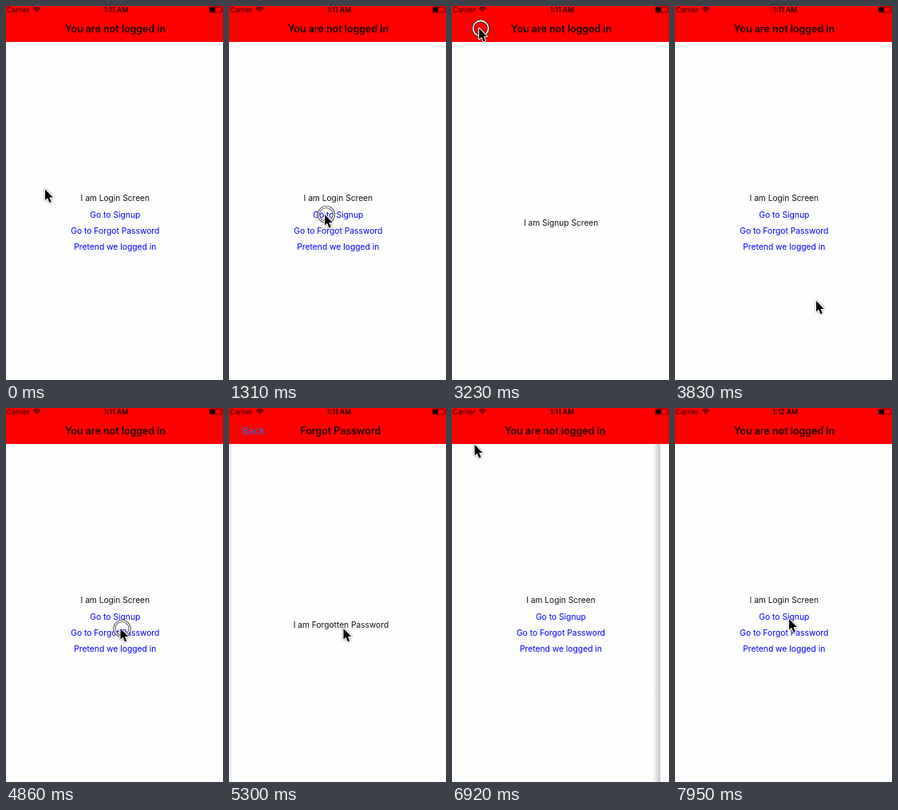
Recreate the animation shown at these times as an HTML page. Size 272 by 468 pixels, loop 8 s.

```html
<!DOCTYPE html>
<html lang="en">
<head>
<meta charset="utf-8">
<title>Login navigation</title>
<style>
  html, body { margin: 0; width: 100%; height: 100%; overflow: hidden; background: #fdfdfd; }
  svg { display: block; width: 100vw; height: 100vh; font-family: Inter, Roboto, sans-serif; }
  text { text-anchor: middle; fill: #111; }
  .body { font-size: 10.2px; }
  .link { font-size: 10.3px; fill: #00f; }
  .title { font-size: 12.44px; font-weight: 600; fill: #1a0000; }
  .status { font-size: 8.7px; fill: #200; }
  .arrow { filter: drop-shadow(0 .8px .8px rgba(0, 0, 0, .5)); }
</style>
</head>
<body>
<svg viewBox="0 0 272 468" xmlns="http://www.w3.org/2000/svg">
  <defs>
    <linearGradient id="fade">
      <stop offset="0" stop-color="#000" stop-opacity="0"/>
      <stop offset=".6" stop-color="#000" stop-opacity=".13"/>
      <stop offset="1" stop-color="#000" stop-opacity=".22"/>
    </linearGradient>
  </defs>

  <rect width="272" height="468" fill="#fdfdfd"/>
  <g id="login">
    <text class="body" x="136.8" y="244.3">I am Login Screen</text>
    <text class="link" x="136.8" y="264.6">Go to Signup</text>
    <text class="link" x="136.8" y="284.8">Go to Forgot Password</text>
    <text class="link" x="136.8" y="305">Pretend we logged in</text>
  </g>

  <g id="card">
    <rect id="shadow" x="-10" y="44" width="10" height="424" fill="url(#fade)"/>
    <rect y="44" width="272" height="424" fill="#fefefe"/>
    <text id="cardText" class="body" x="136.6" y="274.7"></text>
  </g>

  <rect width="272" height="45" fill="#f00"/>
  <text id="loginTitle" class="title" x="137" y="33.2">You are not logged in</text>
  <text id="cardTitle" class="title" x="137" y="33.2"></text>
  <text id="back" x="30.6" y="33.2" font-size="12.33" style="fill:#2a6fe0">Back</text>

  <text class="status" x="15.3" y="8">Carrier</text>
  <g fill="none" stroke="#200" stroke-width="1.3">
    <path d="M34 3.6Q38.5 -.2 43 3.6M35.8 5.3Q38.5 3 41.2 5.3"/>
    <path d="M37.2 6.3L38.5 8L39.8 6.3Q38.5 5.3 37.2 6.3Z" fill="#200" stroke="none"/>
  </g>
  <text id="clock" class="status" x="138" y="8" font-weight="600"></text>
  <rect x="255" y="1.2" width="15.6" height="6.8" rx="1" fill="none" stroke="#400" stroke-width=".8"/>
  <rect x="255.6" y="1.8" width="6.6" height="5.6" fill="#100"/>

  <g id="cursor">
    <g id="ring" fill="none">
      <circle cx="2" cy="0" r="9.6" stroke="#222" stroke-width="3"/>
      <circle cx="2" cy="0" r="9.6" stroke="#fff" stroke-width="1.6"/>
    </g>
    <path class="arrow" d="M0 0V13.6L3.1 10.8L5.5 16.4L7.8 15.4L5.4 10H9.8Z" fill="#000"
      stroke="#fff" stroke-width="2" stroke-linejoin="round" paint-order="stroke"/>
  </g>
</svg>
<script>
const LOOP = 8000;
const el = id => document.getElementById(id);

const bursts = [
  [150, 890, 6], [1310, 2040, 6], [2340, 2940, 5], [3230, 3830, 5],
  [4130, 5160, 8], [5300, 6340, 8], [6480, 7360, 7], [7650, 7950, 3]
];

// Pointer stops: time, x, y
const stops = [
  [40, 49, 229.5], [890, 120, 261], [2220, 120, 261], [2940, 34, 28],
  [3320, 34, 28], [3830, 177, 369], [4040, 177, 369], [4719, 143.5, 276],
  [5360, 143.5, 276], [6340, 33, 28], [6600, 33, 28], [6920, 28.5, 46],
  [7360, 62, 311], [7580, 62, 311], [7950, 143, 264]
];

const presses = [1310, 3230, 4866, 6480];

const signup = { title: "You are not logged in", text: "I am Signup Screen" };
const forgot = { title: "Forgot Password", text: "I am Forgotten Password" };
const moves = [
  { at: 1515, dur: 500, screen: signup, open: true },
  { at: 3425, dur: 400, screen: signup, open: false },
  { at: 5073, dur: 350, screen: forgot, open: true },
  { at: 6680, dur: 466, screen: forgot, open: false }
];

// Refreshes are timed to about 10 ms
function refreshTime(t) {
  let last = 0;
  for (const [a, b, n] of bursts) {
    if (t < a) break;
    const gap = (b - a) / (n - 1);
    last = a + gap * Math.min(n - 1, Math.floor((t + 10 - a) / gap));
  }
  return last;
}

const bez = (s, a, b) => 3 * s * (1 - s) ** 2 * a + 3 * s * s * (1 - s) * b + s ** 3;

// cubic-bezier(.2833, .99, .3183, .99)
function ease(x) {
  if (x >= 1) return 1;
  let lo = 0, hi = 1;
  for (let i = 0; i < 20; i++) {
    const mid = (lo + hi) / 2;
    if (bez(mid, .2833, .3183) < x) lo = mid; else hi = mid;
  }
  return bez(lo, .99, .99);
}

function pointer(t) {
  const i = stops.findIndex(s => s[0] > t);
  if (i === 0) return stops[0].slice(1);
  if (i < 0) return stops[stops.length - 1].slice(1);
  const [t0, x0, y0] = stops[i - 1], [t1, x1, y1] = stops[i];
  const u = (t - t0) / (t1 - t0), k = u * u * (3 - 2 * u);
  return [x0 + (x1 - x0) * k, y0 + (y1 - y0) * k];
}

const shift = (node, x, y = 0) => node.setAttribute("transform", `translate(${x.toFixed(2)} ${y.toFixed(2)})`);
const alpha = (node, a) => node.setAttribute("opacity", a.toFixed(3));

function draw(time) {
  const t = refreshTime(time);
  const move = moves.filter(m => m.at <= t).pop();
  const e = move ? ease((t - move.at) / move.dur) : 0;
  const p = !move ? 0 : move.open ? e : 1 - e;
  const screen = move ? move.screen : signup;
  const x = 272 * (1 - p);
  const pressed = presses.some(a => t >= a - 2 && t < a + 140);

  shift(el("login"), -10 * p);
  alpha(el("login"), p > .999 ? 0 : 1);
  shift(el("card"), x);
  alpha(el("card"), p > 0 ? 1 : 0);
  alpha(el("shadow"), Math.min(1, x / 11));
  el("cardText").textContent = screen.text;

  shift(el("loginTitle"), -200 * p);
  alpha(el("loginTitle"), 1 - p);
  el("cardTitle").textContent = screen.title;
  shift(el("cardTitle"), 200 * (1 - p));
  alpha(el("cardTitle"), p);
  alpha(el("back"), p * (pressed ? .12 : 1));

  el("clock").textContent = t < 7060 ? "1:11 AM" : "1:12 AM";
  shift(el("cursor"), ...pointer(t));
  alpha(el("ring"), pressed ? 1 : 0);
}

const begin = performance.now();
function tick() {
  draw((performance.now() - begin) % LOOP);
  requestAnimationFrame(tick);
}
tick();
</script>
</body>
</html>
```
